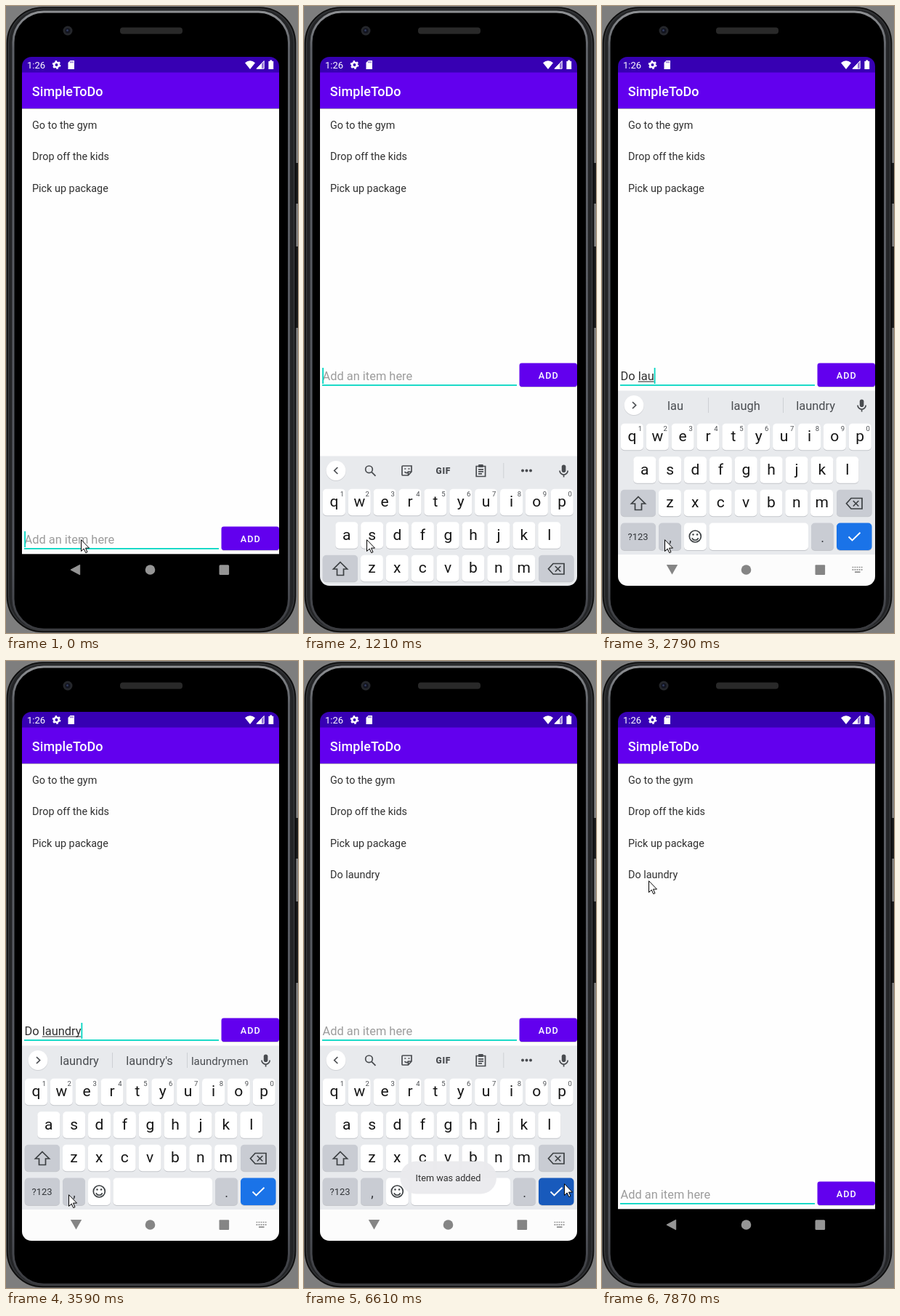
Animation, 402 px wide and 863 px high, one loop 7.99 s. Source, as an HTML page:

```html
<!DOCTYPE html>
<html lang="en">
<head>
<meta charset="utf-8">
<title>To-do list demo</title>
<style>
  html, body { margin: 0; width: 100%; height: 100%; overflow: hidden; background: #7e7e7e; }
  svg { display: block; width: 402px; height: 863px; }
  text { font-family: Roboto, sans-serif; white-space: pre; }
  .mid { text-anchor: middle; }
  .item { font-size: 14.4px; fill: #303030; }
  .edit { font-size: 16.4px; fill: #303030; }
  .hint { fill: #9c9c9c; }
  .letter { font-size: 21px; fill: #161616; }
  .digit { font-size: 9.5px; fill: #4c4f53; }
  .word { fill: #494c50; }
  .line { fill: none; stroke: #494c50; stroke-width: 1.7; }
</style>
</head>
<body>
<svg viewBox="0 0 402 863">
  <defs>
    <clipPath id="glass"><rect x="22" y="70" width="354" height="728" rx="13"/></clipPath>
    <linearGradient id="rim" x2="0" y2="1">
      <stop offset="0" stop-color="#8e9093"/><stop offset=".06" stop-color="#5c5f65"/>
      <stop offset=".9" stop-color="#50535a"/><stop offset="1" stop-color="#3a3b3f"/>
    </linearGradient>
  </defs>

  <!-- phone body -->
  <rect width="402" height="863" fill="#7e7e7e"/>
  <rect x="397" y="216" width="5" height="56" fill="#1b1c1d"/>
  <rect x="397" y="331" width="5" height="112" fill="#1b1c1d"/>
  <rect x="1.5" y="2" width="397" height="859.5" rx="49" fill="#242527" stroke="#0c0c0c" stroke-width="1.6"/>
  <rect x="3.5" y="4" width="393" height="855.5" rx="47" fill="none" stroke="#3a3c3f"/>
  <rect x="10" y="8" width="379.5" height="850" rx="42" fill="#000" stroke="url(#rim)" stroke-width="3"/>
  <rect x="13" y="11" width="374" height="845.5" rx="40" fill="#000"/>
  <circle cx="85" cy="34" r="6.5" fill="#25272b"/>
  <circle cx="85" cy="34" r="3.5" fill="#12141f"/>
  <circle cx="84.5" cy="33.5" r="1.5" fill="#303a5c"/>
  <rect x="157" y="29.5" width="86" height="9" rx="4" fill="#292929"/>

  <g clip-path="url(#glass)">
    <rect x="22" y="70" width="354" height="728" fill="#000"/>
    <rect x="22" y="141" width="354" height="613.3" fill="#fefefe"/>
    <rect x="22" y="141" width="354" height="1" fill="#b4b0ba"/>
    <rect x="22" y="70" width="354" height="22" fill="#3700b3"/>
    <rect x="22" y="91.5" width="354" height="49.5" fill="#6200ee"/>
    <!-- status bar -->
    <g fill="#fff">
      <text x="29" y="85.5" font-size="13">1:26</text>
      <circle cx="69.5" cy="81" r="3.3" fill="none" stroke="#fff" stroke-width="2.6"/>
      <circle cx="69.5" cy="81" r="5" fill="none" stroke="#fff" stroke-width="1.8" stroke-dasharray="2.6 2.636"/>
      <path d="M88.5 75H94V87H85.5V78Z"/>
      <path d="M88.6 76.3v2M90.4 76.3v2M92.2 76.3v2" stroke="#3700b3" stroke-width=".8"/>
      <path d="M329 78.2Q336 72.5 343 78.2L336 87Z"/>
      <path d="M352 79V86.5H344.5Z"/>
      <path d="M355.2 75.6V86.2H345.2Z" fill-opacity=".45" stroke="#fff"/>
      <path d="M363.3 74.5h3V76H368.2V87H361.4V76h1.9Z"/>
      <text x="35.8" y="124" font-size="18" font-weight="500" letter-spacing=".1">SimpleToDo</text>
    </g>
    <g class="item">
      <text x="36" y="168.9">Go to the gym</text>
      <text x="36" y="212.3">Drop off the kids</text>
      <text x="36" y="255.7">Pick up package</text>
      <text x="36" y="299.1" id="added">Do laundry</text>
    </g>

    <!-- dark navigation bar -->
    <g fill="#959595">
      <path d="M89 776L101.7 769.2V782.8Z" stroke="#959595" stroke-linejoin="round"/>
      <circle cx="198.5" cy="776" r="6.8"/>
      <rect x="293.5" y="769.3" width="13.6" height="13.6" rx="1.5"/>
      <g id="imeDark"></g>
    </g>

    <!-- entry row -->
    <g id="row">
      <text x="25.6" y="739.8" class="edit" id="entry"></text>
      <path id="compose" stroke="#303030" stroke-width="1.1"/>
      <rect x="25" y="746" width="268" height="1.8" fill="#03d6c2"/>
      <rect id="caret" y="723" width="1.8" height="22" fill="#03d6c2"/>
      <rect x="297" y="718" width="79" height="32" rx="3.6" fill="#000" opacity=".16"/>
      <rect id="add" x="296.5" y="716.5" width="79.5" height="32.5" rx="3.4"/>
      <text x="322.7" y="737.8" font-size="12.6" font-weight="500" letter-spacing="1.12" fill="#fff">ADD</text>
    </g>

    <!-- keyboard -->
    <g id="board">
      <rect x="22" y="529.5" width="354" height="226" fill="#e8eaed"/>
      <rect x="22" y="755" width="354" height="45" fill="#fcfcfc"/>
      <g fill="#858585">
        <path d="M88.8 769H104.2L96.5 782.5Z"/>
        <circle cx="198.5" cy="776" r="6.8"/>
        <rect x="293.5" y="769.3" width="13.6" height="13.6" rx="1"/>
        <g id="imeLight"></g>
      </g>
      <circle cx="44" cy="550.2" r="13.7" fill="#cfd1d5"/>
      <circle cx="44" cy="549.5" r="13.5" fill="#fff"/>
      <g fill="#494c50">
        <rect x="354.8" y="541.5" width="5.6" height="10.5" rx="2.8"/>
        <path class="line" d="M352 549.5a5.6 5.6 0 0 0 11.2 0M357.6 555v3.6"/>
      </g>
      <g id="words">
        <path class="line" d="M42 545l4.6 4.5-4.6 4.5"/>
        <path d="M146.5 539v21M249.5 539v21" stroke="#cdd0d4"/>
        <text class="word mid" x="101" y="556"></text>
        <text class="word mid" x="197.6" y="556"></text>
        <text class="word mid" x="294.2" y="556"></text>
      </g>
      <g id="tools">
        <path class="line" d="M46.3 545l-4.6 4.5 4.6 4.5"/>
        <circle class="line" cx="89.5" cy="547.8" r="4.8"/>
        <path class="line" d="M93 551.3l5.5 5.5"/>
        <path class="line" d="M136 543h12v8l-4.5 5H136a1 1 0 0 1-1-1V544a1 1 0 0 1 1-1M148 551h-4.5v5M138.5 551q2 2.5 4.5 1"/>
        <path class="line" d="M138.3 547h2M143.5 547h2"/>
        <text class="word mid" x="191.8" y="553.5" font-size="12" font-weight="900" letter-spacing=".7">GIF</text>
        <path class="line" d="M237.2 543.5h12.4V557.5H237.2ZM240 547.8h7M240 550.8h7M240 553.8h5"/>
        <rect x="240" y="541" width="6.8" height="4" rx="1" fill="#494c50"/>
        <path d="M274.8 539v21" stroke="#cdd0d4"/>
        <path d="M301 549.5h.01M306.5 549.5h.01M312 549.5h.01" stroke="#494c50" stroke-width="4" stroke-linecap="round"/>
      </g>
      <g id="keys"></g>
      <g fill="none" stroke="#3c4043" stroke-width="1.7">
        <path d="M50 675.5L59.5 685H54.5V693.5H45.5V685H40.5Z"/>
        <path d="M343 677.5H358V692H343L336.5 684.8ZM345.8 681l7.5 7.5M353.3 681l-7.5 7.5"/>
        <circle cx="128.3" cy="730" r="8"/>
        <path d="M124 732.3a4.6 4.6 0 0 0 8.6 0"/>
        <path d="M125.5 727.5h.01M131.1 727.5h.01" stroke-width="2.6" stroke-linecap="round"/>
        <path d="M339.5 730.5l5 5L355.5 724.8" stroke="#fff" stroke-width="1.9"/>
      </g>
      <g fill="#33363a">
        <text class="mid" x="49.6" y="735" font-size="13">?123</text>
        <text class="mid" x="94" y="738" font-size="18">,</text>
        <text class="mid" x="303.5" y="738" font-size="18">.</text>
      </g>
    </g>

    <g id="toast">
      <rect x="132.5" y="688.5" width="132.5" height="45" rx="22" fill="#ebebee" opacity=".96"/>
      <text class="mid" x="198.5" y="715.6" font-size="12.7" fill="#303030">Item was added</text>
    </g>
  </g>

  <path id="mouse" d="M.5.7V16.5L4.2 13 6.8 18.6 9 17.6 6.5 12.1H11.5Z" fill="#fff" stroke="#000"/>
</svg>

<script>
const LOOP = 7990;
const $ = id => document.getElementById(id);
const show = (id, on) => $(id).setAttribute('visibility', on ? 'visible' : 'hidden');
const shift = (id, x, y) => $(id).setAttribute('transform', `translate(${x} ${y})`);

// Keyboard construction
function key(x, y, w, fill = '#fff', h = 36.5) {
  const box = (dy, color) => `<rect x="${x}" y="${y + dy}" width="${w}" height="${h}" rx="5" fill="${color}"/>`;
  return box(1, '#c3c5ca') + box(0, fill);
}
function letterRow(letters, cx, y, digits = '') {
  return [...letters].map((c, i) => {
    const x = cx + i * 34.87;
    const digit = digits ? `<text class="digit mid" x="${x + 11}" y="585">${digits[i]}</text>` : '';
    return key(x - 15.5, y, 31) + `<text class="letter mid" x="${x}" y="${y + 24.3}">${c}</text>` + digit;
  }).join('');
}
const GREY = '#c9ccd3';
$('keys').innerHTML =
  letterRow('qwertyuiop', 41.4, 574.8, '1234567890') +
  letterRow('asdfghjkl', 58.8, 620.3) +
  letterRow('zxcvbnm', 93.4, 665.8) +
  key(25.7, 665.8, 48.3, GREY) + key(323, 665.8, 48.5, GREY) +
  key(25.7, 711.5, 48.3, GREY, 37.5) + key(78, 711.5, 31, GREY, 37.5) +
  key(113, 711.5, 30.8, '#fff', 37.5) + key(147.5, 711.5, 136.5, '#fff', 37.5) +
  key(288, 711.5, 31, GREY, 37.5) + key(323, 711.5, 48.5, '#1a73e8', 37.5);
const enter = $('keys').lastElementChild;
const letters = document.querySelectorAll('.letter');
const words = document.querySelectorAll('#words text');

const imeIcon = [0, 1, 2].map(r =>
  `<path d="M${r < 2 ? 344.5 : 348} ${772.5 + r * 3.3}h${r < 2 ? 14 : 7.5}" stroke="#8d8d8d" stroke-width="1.7"` +
  (r < 2 ? ' stroke-dasharray="1.8 1.25"' : '') + '/>').join('');
$('imeDark').innerHTML = $('imeLight').innerHTML = imeIcon;

// Timelines: each entry holds until the next one
const TYPED = [[0, ''], [1760, 'D'], [1880, 'Do'], [2120, 'Do '], [2520, 'Do l'], [2660, 'Do la'],
  [2790, 'Do lau'], [2940, 'Do laun'], [3200, 'Do laund'], [3330, 'Do laundr'], [3460, 'Do laundry'], [5150, '']];
const WORDS = [[0, ''], [1760, 'D Do Did'], [1880, "Do So Don't"], [2240, 'you not the'], [2520, 'l let like'],
  [2660, 'la last late'], [2790, 'lau laugh laundry'], [2940, 'laun laundry launch'],
  [3200, "laund laundry laundry's"], [3590, "laundry laundry's laundrymen"], [5280, '']];
const CARET = [[0, 1], [430, 0], [710, 1], [2390, 0], [2520, 1], [4010, 0], [4560, 1], [5560, 0], [6060, 1], [6490, 0]];
const BOARD = [[0, 300], [1090, 90], [1220, 16], [1360, 0], [6880, 90], [7000, 300]];
const TOAST = [[0, 0], [5150, .35], [5280, .8], [5420, 1], [7000, .6], [7130, .2], [7260, 0]];
const ADD = [[0, '#6200ee'], [5000, '#7526f0'], [5150, '#701eee'], [5280, '#680cee'], [5420, '#6200ee']];
const MOUSE = [[0, [103, 734]], [150, [86, 734]],
  [3880, [104, 722]], [4010, [142, 690]], [4140, [198, 640]], [4270, [250, 585]], [4420, [296, 540]],
  [4560, [317, 517]], [4700, [323, 510]], [6060, [343, 630]], [6210, [358, 714]], [6490, [358, 719]],
  [7130, [342, 690]], [7260, [282, 590]], [7380, [205, 475]], [7510, [150, 404]],
  [7630, [112, 365]], [7750, [76, 318]], [7870, [64, 302]]];

const at = (line, t) => line.findLast(([start]) => start <= t)[1];
const between = (t, a, b) => t >= a && t < b;

const pen = document.createElement('canvas').getContext('2d');
function width(s) {
  pen.font = '16.4px Roboto, sans-serif';
  return pen.measureText(s).width;
}

function drawEntry(t) {
  const typed = at(TYPED, t);
  const end = 25.6 + width(typed);
  const start = 25.6 + width(typed.slice(0, typed.lastIndexOf(' ') + 1));
  $('entry').textContent = typed || 'Add an item here';
  $('entry').classList.toggle('hint', !typed);
  $('compose').setAttribute('d', end > start ? `M${start} 742H${end}` : '');
  $('caret').setAttribute('x', typed ? end : 25.2);
  show('caret', at(CARET, t));
  $('add').setAttribute('fill', at(ADD, t));
  shift('row', 0, between(t, 840, 7130) ? -225 : 0);
}

function drawBoard(t) {
  const list = at(WORDS, t);
  const caps = between(t, 1630, 1880);
  shift('board', 0, at(BOARD, t));
  show('words', list);
  show('tools', !list);
  list.split(' ').forEach((word, i) => {
    words[i].textContent = word;
    words[i].setAttribute('font-size', word.length > 9 ? 15 : 16.4);
  });
  letters.forEach(el => {
    const c = el.textContent;
    el.textContent = caps ? c.toUpperCase() : c.toLowerCase();
  });
  enter.setAttribute('fill', between(t, 6490, 6760) ? '#185abc' : '#1a73e8');
}

function render(t) {
  drawEntry(t);
  drawBoard(t);
  show('added', t >= 5150);
  show('imeDark', between(t, 840, 7130));
  $('toast').setAttribute('opacity', at(TOAST, t));
  shift('mouse', ...at(MOUSE, t));
}

const begin = performance.now();
function tick() {
  render((performance.now() - begin) % LOOP);
  requestAnimationFrame(tick);
}
tick();
</script>
</body>
</html>
```
